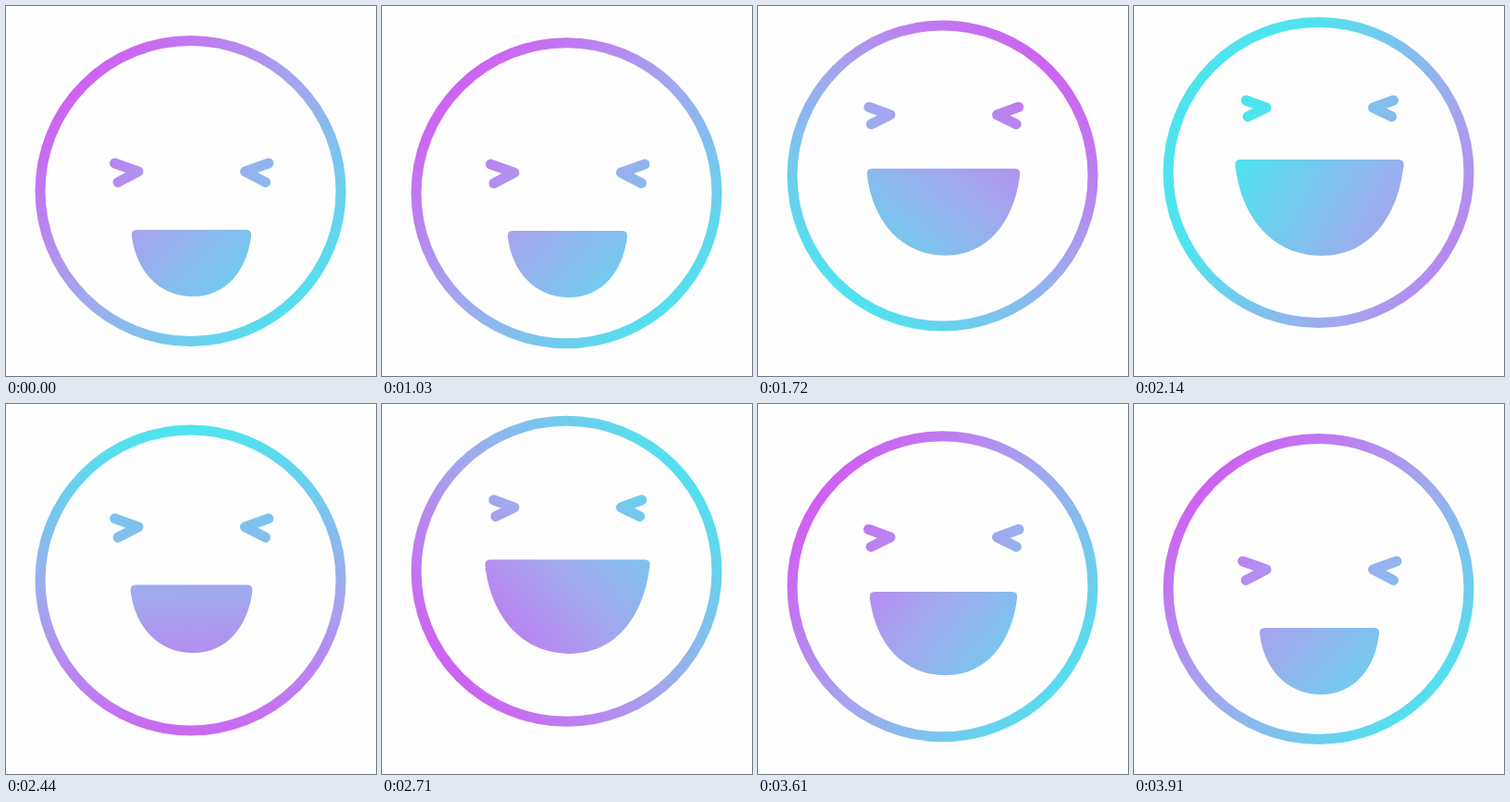
These frames come from a looping animation (400 px wide and 400 px high, 3.94 s). An HTML page with a canvas:

```html
<!DOCTYPE html>
<html lang="en">
<head>
<meta charset="utf-8">
<title>Laughing face</title>
<style>
  html, body { margin: 0; width: 100%; height: 100%; overflow: hidden; background: #fefefe; }
  canvas { display: block; width: 400px; height: 400px; }
</style>
</head>
<body>
<canvas id="stage" width="400" height="400"></canvas>
<script>
const LOOP = 3940;
const ctx = document.getElementById('stage').getContext('2d');

// Poses: ring centre y, eye y, mouth openness
const REST = [200, 179, 0];
const DIP = [220, 189, 0];
const UP = [180, 110, 1];
const BOB = [191, 134, 0];

const poses = [
  [1000, REST], [1150, DIP], [1408, UP], [1623, UP],
  [1884, BOB], [2145, UP], [2406, BOB], [2667, UP], [2928, BOB], [3189, UP],
  [3495, UP], [3751, DIP], [3905, REST]
];

// Gradient: angle in degrees, middle x, middle y
const turns = [
  [1000, [45, 200, 200]], [1300, [59, 200, 196]], [2140, [208, 280, 226]],
  [2710, [319, 200, 185]], [3160, [370, 226, 186]], [3905, [405, 200, 200]]
];

function segment(keys, t) {
  let i = 0;
  while (i < keys.length - 2 && t >= keys[i + 1][0]) i++;
  const span = keys[i + 1][0] - keys[i][0];
  const u = Math.min(1, Math.max(0, (t - keys[i][0]) / span));
  return { i, u, span };
}

function eased(keys, t) {
  const { i, u } = segment(keys, t);
  const k = u * u * (3 - 2 * u);
  return keys[i][1].map((v, n) => v + (keys[i + 1][1][n] - v) * k);
}

function slope(keys, i, n) {
  if (i === 0 || i === keys.length - 1) return 0;
  const [a, b] = [keys[i - 1], keys[i + 1]];
  return (b[1][n] - a[1][n]) / (b[0] - a[0]);
}

function spline(keys, t) {
  const { i, u, span } = segment(keys, t);
  const k = u * u * (3 - 2 * u);
  return keys[i][1].map((v, n) =>
    v + (keys[i + 1][1][n] - v) * k +
    span * u * (1 - u) * ((1 - u) * slope(keys, i, n) - u * slope(keys, i + 1, n)));
}

function paint(t) {
  const [deg, mx, my] = spline(turns, t);
  const dx = 180 * Math.cos(deg * Math.PI / 180);
  const dy = 180 * Math.sin(deg * Math.PI / 180);
  const g = ctx.createLinearGradient(mx - dx, my - dy, mx + dx, my + dy);
  g.addColorStop(0, '#d25cf2');
  g.addColorStop(0.5, '#a2a8ee');
  g.addColorStop(1, '#4ee4ee');
  return g;
}

function eye(x, y, side, open) {
  ctx.beginPath();
  ctx.moveTo(x + side * (25.5 - 3.5 * open), y - 9 + open);
  ctx.lineTo(x, y);
  ctx.lineTo(x + side * (22 - 2 * open), y + 11.5 - 2 * open);
  ctx.stroke();
}

function mouth(x, y, open) {
  const w = 65 + 26.5 * open;
  const h = 72 + 32 * open;
  ctx.save();
  ctx.translate(x, y);
  // The gradient must stay in stage space, so only the path is shifted
  ctx.beginPath();
  ctx.moveTo(6 - w, 0);
  ctx.lineTo(w - 6, 0);
  ctx.quadraticCurveTo(w + 0.5, 0, w - 0.5, 7);
  ctx.bezierCurveTo(w * 0.92, h * 0.61, w * 0.58, h, w * 0.03, h);
  ctx.bezierCurveTo(-w * 0.55, h, -w * 0.92, h * 0.61, 0.5 - w, 7);
  ctx.quadraticCurveTo(-w - 0.5, 0, 6 - w, 0);
  ctx.restore();
  ctx.fill();
}

function draw(t) {
  const [ringY, eyeY, open] = eased(poses, t);
  ctx.fillStyle = '#fefefe';
  ctx.fillRect(0, 0, 400, 400);
  ctx.fillStyle = ctx.strokeStyle = paint(t);
  ctx.lineWidth = 11;
  ctx.lineCap = ctx.lineJoin = 'round';

  ctx.beginPath();
  ctx.arc(199.5, ringY, 162.5, 0, 2 * Math.PI);
  ctx.stroke();

  eye(143, eyeY, -1, open);
  eye(258.5, eyeY, 1, open);
  mouth(200.5, eyeY + 63 - 7 * open, open);
}

const start = performance.now();
function tick() {
  draw((performance.now() - start) % LOOP);
  requestAnimationFrame(tick);
}
tick();
</script>
</body>
</html>
```
